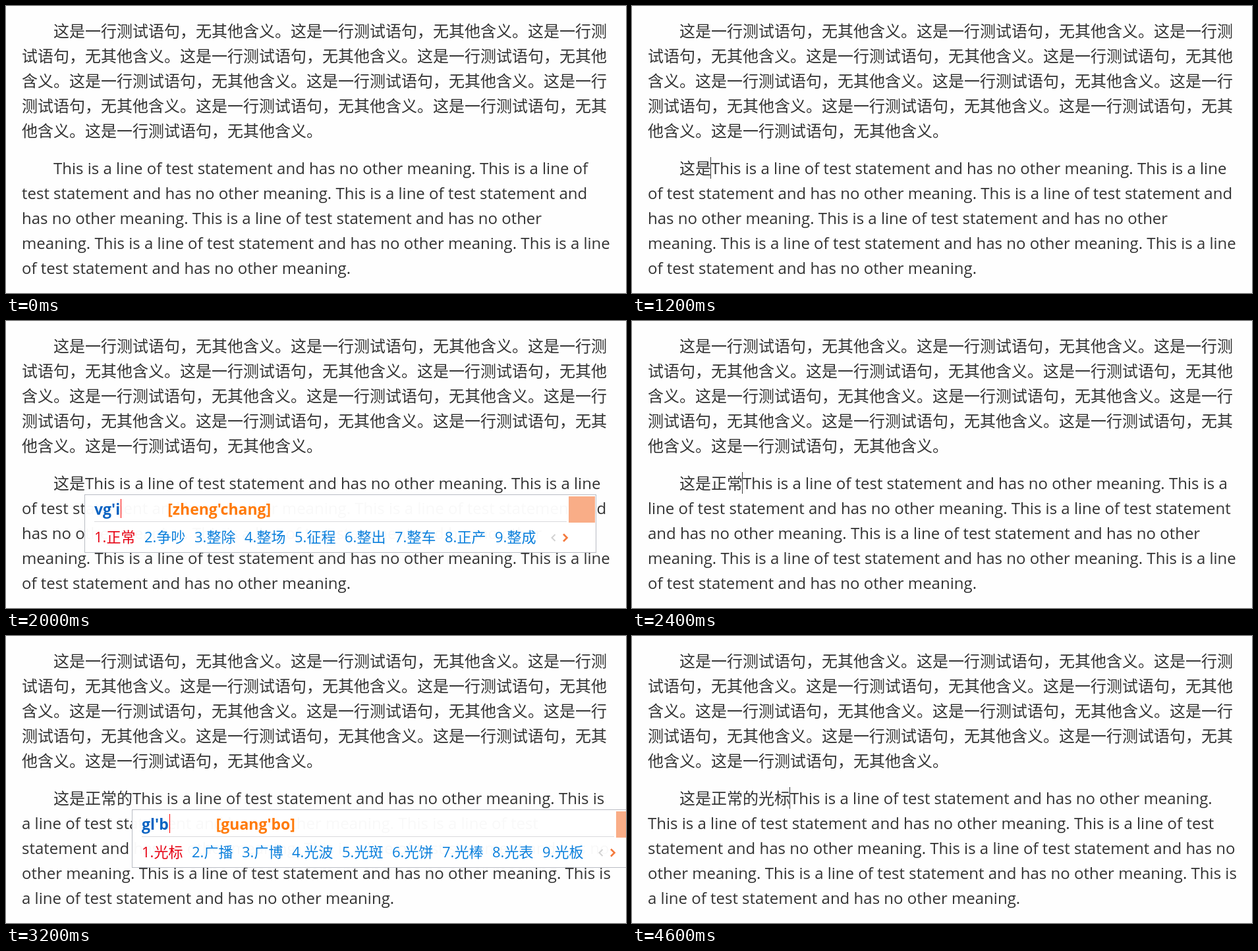
Write an HTML page that moves like this. It is 941x437 px and loops after 5200 ms.

```html
<!DOCTYPE html>
<html lang="zh-CN">
<head>
<meta charset="utf-8">
<title>Input method demo</title>
<style>
  html, body { margin: 0; width: 100%; height: 100%; overflow: hidden; background: #fefefe; }
  #stage {
    position: relative; width: 941px; height: 437px; overflow: hidden;
    font: 24px/38px "Open Sans", "Noto Sans CJK SC", "Noto Sans CJK", sans-serif;
    color: #333; text-spacing-trim: space-all; text-autospace: no-autospace;
  }
  p { position: absolute; left: 24px; width: 896px; margin: 0; text-indent: 2em; }
  #chinese { top: 19px; }
  #english { top: 228px; }
  #caret { position: absolute; top: 230px; width: 1px; height: 33px; background: #333; }

  #popup {
    position: absolute; top: 264px; height: 89px; box-sizing: border-box;
    padding: 48px 90.6px 0 14px; border: 1px solid #b9bcc4;
    background: rgba(255, 255, 255, .97); white-space: nowrap;
  }
  #input { position: absolute; left: 14px; top: 5px; display: flex; font: bold 23px/32px "Open Sans", sans-serif; }
  #code { color: #0a63c2; }
  #codeCaret { width: 1px; height: 29px; margin: 1px 70px 0 1px; }
  #reading { color: #ff7a0a; }
  #candidates { display: flex; gap: 13.57px; font-size: 22px; line-height: 30px; color: #0a7fdc; }
  #candidates :first-child { color: #e60012; }
  #rule { position: absolute; left: 14px; right: 44px; top: 40px; height: 1px; background: #d9d9dc; }
  #arrows { position: absolute; right: 40px; top: 57px; fill: none; }
  #badge { position: absolute; right: 1px; top: 2px; width: 40px; height: 40px; background: #f9ad87; }
</style>
</head>
<body>
<div id="stage">
  <p id="chinese"></p>
  <p id="english" lang="en"></p>
  <div id="caret"></div>
  <div id="popup">
    <div id="input"><span id="code"></span><i id="codeCaret"></i><span id="reading"></span></div>
    <div id="rule"></div>
    <div id="candidates"></div>
    <svg id="arrows" width="30" height="16">
      <path d="M8.5 3 3.5 8l5 5" stroke="#d2d2d2" stroke-width="2"/>
      <path d="M21 2.5 26.5 8 21 13.5" stroke="#f47a3d" stroke-width="2.6"/>
    </svg>
    <div id="badge"></div>
  </div>
</div>
<script>
const LOOP = 5200;
const $ = id => document.getElementById(id);

const ZHONG = '中 这 值 真 只 着 找 帧 张';
const input = (code, reading, words, caretColor = '#f00') => ({ code, reading, words, caretColor });

// start time, committed text, caret visible, input method state
const steps = [
  [0, '', false],
  [400, '', true],
  [800, '', true, input('v', 'zhong', ZHONG)],
  [1000, '', false, input('ve', 'zhe', '这 着 者 折 哲 浙 遮 辙 蔗')],
  [1200, '这是', true],
  [1600, '这是', true, input('v', 'zhong', ZHONG)],
  [1800, '这是', false, input('vg', 'zheng', '正 整 证 争 政 征 挣 睁 蒸')],
  [2000, '这是', false, input("vg'i", "zheng'chang", '正常 争吵 整除 整场 征程 整出 整车 正产 整成')],
  [2400, '这是正常', true],
  [2600, '这是正常的', true],
  [2800, '这是正常的', true, input('g', 'ge', '个 给 改 该 跟 过 高 哥 刚', '#222')],
  [3000, '这是正常的', true, input('gl', 'guang', '光 广 逛 咣 犷 胱 桄 洸 珖')],
  [3200, '这是正常的', false, input("gl'b", "guang'bo", '光标 广播 广博 光波 光斑 光饼 光棒 光表 光板')],
  [3400, '这是正常的', false, input("gl'bn", "guang'biao", '光标 光标键 广标 光镖 光表 广表 逛表 光膘 广镖')],
  [3600, '这是正常的光标', true],
  [4200, '这是正常的光标', false],
  [4600, '这是正常的光标', true],
];

const sentence = 'This is a line of test statement and has no other meaning. ';
$('chinese').textContent = '这是一行测试语句，无其他含义。'.repeat(11);

function show([, typed, caretOn, ime]) {
  const x = typed ? 71 + 24 * typed.length : 72;
  $('english').textContent = typed + sentence.repeat(6);
  $('caret').style.left = $('popup').style.left = x + 'px';
  $('caret').hidden = !caretOn;
  $('popup').style.display = ime ? '' : 'none';
  if (!ime) return;
  $('code').textContent = ime.code;
  $('codeCaret').style.background = ime.caretColor;
  $('reading').textContent = `[${ime.reading}]`;
  $('candidates').replaceChildren(...ime.words.split(' ').map((word, i) => {
    const item = document.createElement('span');
    item.textContent = `${i + 1}.${word}`;
    return item;
  }));
}

let current;
function tick() {
  const t = performance.now() % LOOP;
  const step = steps.findLast(([start]) => start <= t);
  if (step !== current) show(current = step);
  requestAnimationFrame(tick);
}
tick();
</script>
</body>
</html>
```
